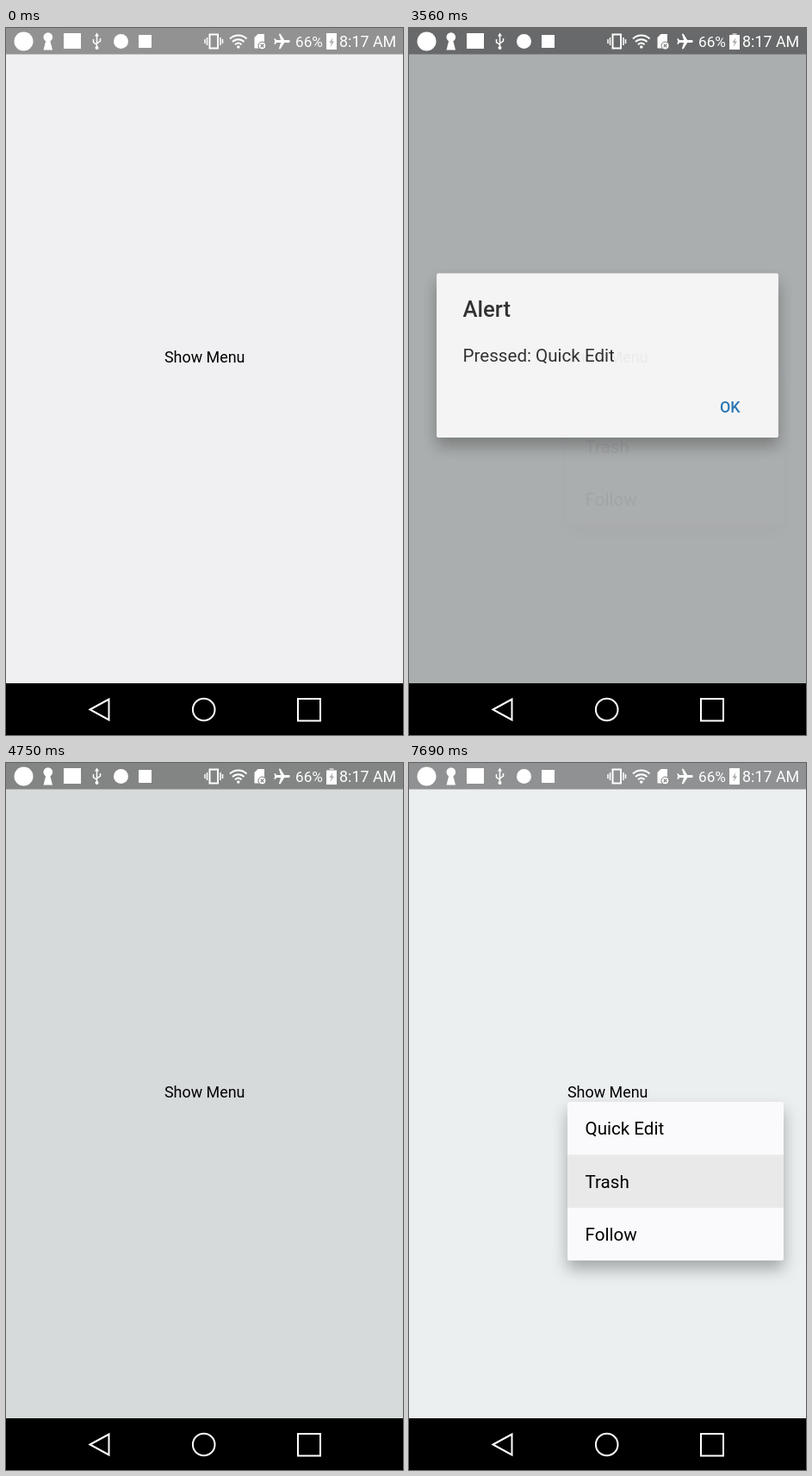
These frames come from a looping animation (461 px wide and 820 px high, 8 s). An HTML page:

```html
<!DOCTYPE html>
<html lang="en">
<head>
<meta charset="utf-8">
<title>Popup menu</title>
<style>
  html, body { margin: 0; width: 100%; height: 100%; overflow: hidden; background: #000; }
  svg { display: block; }
  text { font-family: Roboto, Arial, sans-serif; }
  .small { font-size: 17.9px; }
  .body { font-size: 20.6px; }
  .bold { font-weight: 500; }
  .line { fill: none; stroke: #fff; stroke-width: 2; }
  .thin { fill: none; stroke: #fff; stroke-width: 1.5; }
  .shadow { filter: drop-shadow(0 10px 9px rgba(0, 0, 0, .3)); }
  #alert { transform-origin: 230.5px 380px; }
</style>
</head>
<body>
<svg width="461" height="820" viewBox="0 0 461 820">
  <rect id="page" width="461" height="820"/>
  <rect id="bar" width="461" height="30.5"/>
  <rect id="press" x="184" y="368" width="93" height="25" fill="#e3e5e5"/>
  <text class="small" x="184" y="387.5">Show Menu</text>

  <g id="menu">
    <rect id="back" class="shadow" x="184" rx="2" fill="#fafafc"/>
    <svg id="clip" x="184">
      <g id="items">
        <rect id="row" width="251" height="61.4" fill="#e9e9e9"/>
        <g class="body">
          <text x="20.5" y="38.3">Quick Edit</text>
          <text x="20.5" y="99.8">Trash</text>
          <text x="20.5" y="161.3">Follow</text>
        </g>
      </g>
    </svg>
  </g>

  <rect id="dim" width="461" height="820"/>
  <g id="alert">
    <rect class="shadow" x="32" y="284.5" width="397" height="190.5" rx="2" fill="#f9f9f9"/>
    <text class="bold" font-size="25.6" x="62.5" y="335" fill="#2b2b2b">Alert</text>
    <text class="body" x="62.5" y="387" fill="#2b2b2b">Pressed: Quick Edit</text>
    <text class="small bold" x="361" y="446.5" fill="#2474b5">OK</text>
  </g>

  <!-- status bar -->
  <g fill="#fff">
    <circle cx="20.5" cy="15.5" r="11"/>
    <path d="M46.3 14.5 43.5 25.5h10.5L51.2 14.5z"/><circle cx="48.8" cy="10.5" r="5.3"/>
    <rect x="67" y="6" width="20" height="18"/>
    <path class="thin" d="M105.5 8v15M101.500 13v3.500l4 3M109.500 12v3l-4 3"/>
    <path d="M105.500 5.500l2.500 4h-5z"/><circle cx="105.500" cy="23" r="2"/>
    <circle cx="133.500" cy="15.500" r="8.500"/>
    <rect x="154" y="8" width="15" height="15"/>
    <rect class="line" x="236.500" y="7.500" width="9.500" height="16"/>
    <path class="thin" d="M233.500 11v9M231 13v5M249 11v9M251.500 13v5"/>
    <path class="line" d="M260 12.500a14 14 0 0 1 19.500 0M263 16a9.500 9.500 0 0 1 13.500 0M266 19.300a5 5 0 0 1 7.500 0"/>
    <circle cx="269.800" cy="22" r="1.800"/>
    <path d="M292.500 7h7.500v9h-3v7.500h-8.500V11z"/>
    <circle cx="297.500" cy="20.500" r="4.500" stroke="#777" stroke-width="1"/>
    <path d="M295.700 18.700l3.600 3.600m0-3.600l-3.600 3.600" stroke="#777" stroke-width="1.200"/>
    <path transform="translate(320.500 15.500) rotate(90) scale(.92) translate(-11.500 -12)"
      d="M21 16v-2l-8-5V3.500c0-.83-.67-1.500-1.500-1.500S10 2.670 10 3.500V9l-8 5v2l8-2.500V19l-2 1.500V22l3.500-1 3.500 1v-1.500L13 19v-5.500z"/>
    <text font-size="17.2" x="336" y="22.300">66%</text>
    <path opacity=".55" d="M375.500 6h5v2h3.500v17h-12V8h3.500z"/>
    <rect id="charge" x="372" width="12"/>
    <path d="M379.500 11l-4 6h2.500l-1.500 5 4.500-6.500h-2.500z" fill="#aaa"/>
    <text class="small" x="387" y="22.300">8:17 AM</text>
  </g>

  <!-- navigation bar -->
  <rect y="760" width="461" height="60"/>
  <path class="line" d="M97.500 790.500 119.500 778.500V802.500z"/>
  <circle class="line" cx="229.700" cy="790.500" r="12.800"/>
  <rect class="line" x="339" y="778" width="26" height="25.500"/>
</svg>
<script>
const LOOP = 8000, OPEN_TIME = 270, FADE_TIME = 175;
const el = id => document.getElementById(id);
const set = (id, attrs) => {
  for (const k in attrs) el(id).setAttribute(k, attrs[k]);
};
const ramp = (t, start, length) => Math.min(1, Math.max(0, (t - start) / length));
const mix = (a, b, p) => a + (b - a) * p;
const within = (t, a, b) => t >= a && t < b;

// cubic-bezier(.4, 0, .2, 1), solved by bisection
function ease(x) {
  let lo = 0, hi = 1, s = .5;
  for (let i = 0; i < 20; i++) {
    s = (lo + hi) / 2;
    const r = 1 - s;
    if (1.2 * r * r * s + .6 * r * s * s + s * s * s < x) lo = s; else hi = s;
  }
  return s * s * (3 - 2 * s);
}

function drawMenu(t) {
  const u = ramp(t, t < 4000 ? 1690 : 5500, OPEN_TIME);
  const p = u < 1 ? ease(u) : 1;
  const width = mix(131, 251, p), height = mix(12, 184, p), y = mix(365, 393, p);
  const fade = t < 4000 ? 1 - ramp(t, 3380, 190) : 1;
  set('menu', { opacity: Math.min(1, u / .3) * fade });
  set('back', { y, width, height });
  set('clip', { y, width, height });
  set('items', { transform: `translate(${(width - 251) / 2} ${(height - 184) / 2})` });
  set('row', {
    y: t < 4000 ? 0 : 61.4,
    opacity: +(within(t, 3250, 3570) || t >= 6380)
  });
}

function drawAlert(t) {
  set('dim', { opacity: .6 * (ramp(t, 3481, FADE_TIME) - ramp(t, 4601, FADE_TIME)) });
  set('alert', { opacity: ramp(t, 3480, 86) - ramp(t, 4600, 58) });
  const scale = 1 - .1 * (1 - ramp(t, 3480, 120)) ** 5;
  el('alert').style.transform = `scale(${scale})`;
}

function draw(t) {
  const warm = t < 1190;
  set('page', { fill: warm ? '#f0eff1' : '#ebeff0' });
  set('bar', { fill: warm ? '#929292' : '#8f9192' });
  set('press', { opacity: +(within(t, 1560, 1940) || within(t, 5500, 5690)) });
  drawMenu(t);
  drawAlert(t);
  const top = [11, 9, 8, 6][Math.floor((t + 1810) / 500) % 4];
  set('charge', { y: top, height: 25 - top });
}

const began = performance.now();
function tick() {
  draw((performance.now() - began) % LOOP);
  requestAnimationFrame(tick);
}
tick();
</script>
</body>
</html>
```
